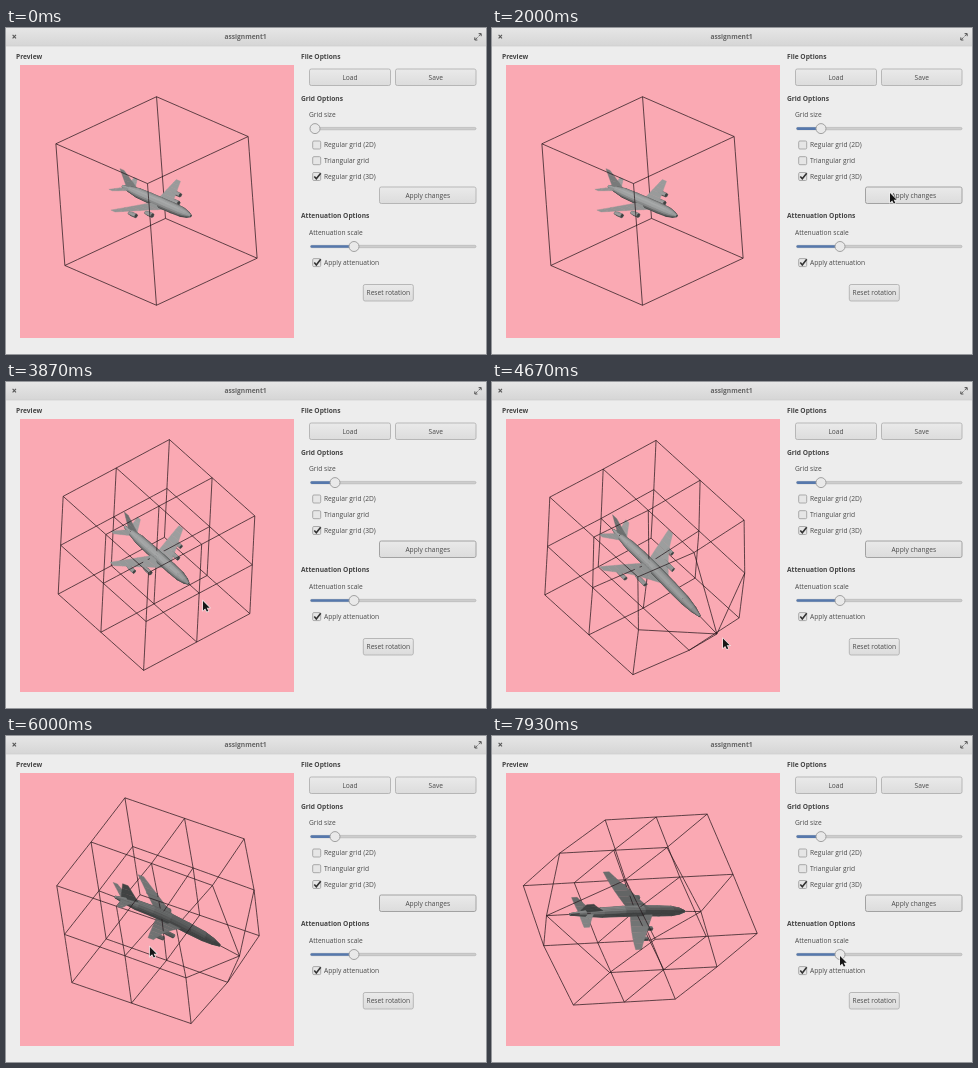
These frames come from a looping animation (480 px wide and 326 px high, 8000 ms). An HTML page with a canvas:

```html
<!DOCTYPE html>
<html lang="en">
<head>
<meta charset="utf-8">
<title>assignment1</title>
<style>
html, body { margin: 0; width: 100%; height: 100%; overflow: hidden; background: #ededed; }
svg, canvas { position: absolute; left: 0; top: 0; width: 480px; height: 326px; display: block; }
text { font: 6.65px "Open Sans", "Noto Sans", sans-serif; fill: #4a4a4a; }
.b { font-weight: 700; fill: #444; }
.title { fill: #666; }
.m { text-anchor: middle; }
.btn { fill: url(#face); stroke: #b2b2b2; stroke-width: .9; }
.btn.focus { stroke: #a2a2a2; stroke-width: 1; }
.btn.down { fill: #d2d2d2; }
.knob { fill: #e9e9e9; stroke: #999; stroke-width: .9; }
</style>
</head>
<body>
<svg id="ui" viewBox="0 0 480 326">
  <defs>
    <linearGradient id="bar" x1="0" y1="0" x2="0" y2="1">
      <stop offset="0" stop-color="#e6e6e6"/><stop offset="1" stop-color="#d6d6d6"/>
    </linearGradient>
    <linearGradient id="face" x1="0" y1="0" x2="0" y2="1">
      <stop offset="0" stop-color="#eaeaea"/><stop offset="1" stop-color="#dcdcdc"/>
    </linearGradient>
  </defs>
  <rect width="480" height="326" fill="#ededed"/>
  <rect width="480" height="17.5" fill="url(#bar)"/>
  <rect y="17.5" width="480" height=".8" fill="#c6c6c6"/>
  <path d="M6.6 6.9l3.4 3.4m0-3.4l-3.4 3.4" stroke="#555" stroke-width="1.1"/>
  <path d="M472.6 8.2l2.4-2.4m-3.6 3.6l-2.4 2.4M472.6 5.6h2.6v2.6m-6.4 1.2v2.6h2.6" stroke="#555" fill="none"/>
  <rect x="14" y="37" width="274" height="273" fill="#faa9b3"/>
</svg>
<canvas id="view" width="480" height="326"></canvas>
<svg viewBox="0 0 480 326">
  <path id="cursor" d="M0 0v9.4l2.2-2 1.6 3.2 1.5-.7-1.6-3.2h3z" fill="#161616" stroke="#f0f0f0" stroke-width="1.2" paint-order="stroke"/>
</svg>
<script>
const LOOP = 8000;
const ui = document.getElementById('ui');
const view = document.getElementById('view').getContext('2d');
const cursor = document.getElementById('cursor');

// ---------- window controls ----------
function add(tag, attrs, label) {
  const node = document.createElementNS('http://www.w3.org/2000/svg', tag);
  for (const k in attrs) node.setAttribute(k, attrs[k]);
  if (label) node.textContent = label;
  ui.append(node);
  return node;
}
const text = (x, y, label, cls = '') => add('text', { x, y, class: cls }, label);

function button(x, y, w, label) {
  const box = add('rect', { x, y, width: w, height: 16.5, rx: 1.8, class: 'btn' });
  text(x + w / 2, y + 10.6, label, 'm');
  return box;
}
function check(y, label, on) {
  add('rect', { x: 306.7, y: y - 4, width: 8, height: 8, rx: 1.2, fill: '#e6e6e6', stroke: '#a2a2a2', 'stroke-width': .9 });
  if (on) add('path', { d: `M308.3 ${y}l2 2.3 4.4-5.6`, fill: 'none', stroke: '#333', 'stroke-width': 1.6 });
  text(318, y + 2.4, label);
}
function slider(y, value) {
  add('rect', { x: 304.5, y: y - 1.2, width: 165.5, height: 2.4, rx: 1.2, fill: '#cdcdcd', stroke: '#b0b0b0', 'stroke-width': .6 });
  const fill = add('rect', { x: 304.5, y: y - 1.3, height: 2.6, rx: 1.3, fill: '#5678ac' });
  const knob = add('circle', { cy: y, r: 5, class: 'knob' });
  const set = x => { fill.setAttribute('width', x - 304.5); knob.setAttribute('cx', x); };
  set(value);
  return set;
}

text(239.5, 11.4, 'assignment1', 'b m title');
text(10, 31, 'Preview', 'b');
text(295, 31, 'File Options', 'b');
button(303.5, 41, 81, 'Load');
button(389.5, 41, 80.5, 'Save');
text(295, 72.5, 'Grid Options', 'b');
text(303, 89, 'Grid size');
const setSize = slider(100.6, 309);
check(117, 'Regular grid (2D)');
check(132.7, 'Triangular grid');
check(148.5, 'Regular grid (3D)', true);
const apply = button(373.5, 159, 96.5, 'Apply changes');
text(295, 190.2, 'Attenuation Options', 'b');
text(303, 206.5, 'Attenuation scale');
slider(218.5, 348);
check(234.6, 'Apply attenuation', true);
button(357.3, 256.5, 50, 'Reset rotation');

// ---------- motion tables: time, then values ----------
const cursorKeys = [
  [70, 382, 44], [800, 309, 100], [1200, 309, 100], [1650, 329, 101], [1730, 329, 101],
  [1950, 398, 165], [2750, 398, 165], [3130, 318, 196], [3330, 170, 160], [3700, 172, 188],
  [3860, 197, 219], [4000, 197, 219], [4750, 235, 261], [5200, 235, 261], [6000, 144, 211],
  [6500, 104, 178], [6600, 98, 176], [6800, 72, 177], [7050, 46, 180], [7400, 290, 200], [7850, 348, 220]
];
const sizeKeys = [[1200, 309], [1650, 329]];
// screen x row and y row of the model axes
const start = [.674, .066, -.7405, .293, .894, .345];
const tilted = [.6305, -.0367, -.7845, .557, .711, .4106];
const turned = [.858, -.4985, .11, .275, .6525, .711];
const level = [.711, -.601, .367, -.051, .484, .865];
const spinKeys = [[3330, ...start], [3700, ...tilted], [5200, ...tilted], [6000, ...turned], [6500, ...level]];
const handles = [
  { at: [1, 0, 0], pull: [.7, .46, -.126], keys: [[4000, 0], [4750, 1]] },
  { at: [-1, 0, 0], pull: [-.503, .447, -.214], keys: [[6600, 0], [6800, .38], [7050, 1]] }
];

function sample(keys, t) {
  const i = keys.findIndex(k => k[0] > t);
  if (i === 0) return keys[0].slice(1);
  if (i < 0) return keys[keys.length - 1].slice(1);
  const a = keys[i - 1], b = keys[i], f = (t - a[0]) / (b[0] - a[0]);
  return a.slice(1).map((v, j) => v + (b[j + 1] - v) * f);
}

// ---------- vectors ----------
const dot = (a, b) => a[0] * b[0] + a[1] * b[1] + a[2] * b[2];
const mix = (a, b, f) => a.map((v, i) => v + (b[i] - v) * f);
const unit = a => { const l = Math.hypot(...a) || 1; return a.map(v => v / l); };
const cross = (a, b) => [a[1] * b[2] - a[2] * b[1], a[2] * b[0] - a[0] * b[2], a[0] * b[1] - a[1] * b[0]];
const sub = (a, b) => a.map((v, i) => v - b[i]);

// ---------- lattice ----------
const steps = [-1, 0, 1];
const lattice = [];
for (const x of steps) for (const y of steps) for (const z of steps) lattice.push([x, y, z]);

function edges(cuts) {
  const list = [], span = cuts[1] - cuts[0];
  for (let axis = 0; axis < 3; axis++)
    for (const from of cuts.slice(0, -1)) for (const b of cuts) for (const c of cuts) {
      const p = [0, 0, 0];
      p[axis] = from; p[(axis + 1) % 3] = b; p[(axis + 2) % 3] = c;
      const q = p.slice();
      q[axis] += span;
      list.push([p, q]);
    }
  return list;
}
const coarse = edges([-1, 1]), fine = edges(steps);

// ---------- aeroplane: x to the nose, y down, z along a wing ----------
const faces = [];
function tube(profile, y, z, n) {
  const ring = ([x, r]) => Array.from({ length: n }, (_, i) => {
    const a = i / n * 2 * Math.PI;
    return [x, y + r * Math.sin(a), z + r * Math.cos(a)];
  });
  for (let k = 1; k < profile.length; k++) {
    const a = ring(profile[k - 1]), b = ring(profile[k]);
    for (let i = 0; i < n; i++) { const j = (i + 1) % n; faces.push([a[i], a[j], b[j], b[i]]); }
  }
  faces.push(ring(profile[0]), ring(profile[profile.length - 1]));
}
function plate(rootA, rootB, tipA, tipB, n) {
  for (let i = 0; i < n; i++) {
    const f = i / n, g = (i + 1) / n;
    faces.push([mix(rootA, tipA, f), mix(rootA, tipA, g), mix(rootB, tipB, g), mix(rootB, tipB, f)]);
  }
}
tube([[-.74, .012], [-.58, .042], [-.4, .07], [-.15, .076], [.1, .077], [.35, .077], [.55, .07], [.67, .046], [.75, .012]], 0, 0, 16);
for (const s of [-1, 1]) {
  plate([.26, .03, .05 * s], [-.06, .03, .05 * s], [-.19, -.01, .65 * s], [-.28, -.01, .65 * s], 6);
  plate([-.5, -.02, .03 * s], [-.66, -.02, .03 * s], [-.69, -.04, .25 * s], [-.76, -.04, .25 * s], 3);
  tube([[.04, .02], [.1, .03], [.19, .03]], .075, .26 * s, 6);
  tube([[-.12, .02], [-.06, .028], [.03, .028]], .065, .44 * s, 6);
}
plate([-.4, -.06, 0], [-.66, -.03, 0], [-.68, -.28, 0], [-.77, -.28, 0], 3);

// ---------- drawing ----------
const light = unit([-.45, -.55, .7]);

function drawScene(t) {
  const row = sample(spinKeys, t);
  const X = unit(row.slice(0, 3));
  let Y = row.slice(3);
  const lean = dot(X, Y);
  Y = unit(Y.map((v, i) => v - lean * X[i]));
  const Z = cross(X, Y);

  const active = handles.map(h => ({ ...h, f: sample(h.keys, t)[0] })).filter(h => h.f > 0);
  const shifts = lattice.map(g => active.reduce((s, h) => {
    const w = h.f * Math.exp(-1.6 * Math.hypot(...sub(g, h.at)));
    return s.map((v, i) => v + h.pull[i] * w);
  }, [0, 0, 0]));

  const project = p => {
    const q = p.slice();
    if (active.length) lattice.forEach((g, k) => {
      let w = 1;
      for (let i = 0; i < 3; i++) w *= Math.max(0, 1 - Math.abs(p[i] - g[i]));
      if (w) for (let i = 0; i < 3; i++) q[i] += w * shifts[k][i];
    });
    return [150.5 + 68.2 * dot(X, q), 173 + 68.2 * dot(Y, q), 68.2 * dot(Z, q)];
  };

  const items = faces.map(face => {
    const pts = face.map(project);
    let n = unit(cross(sub(pts[2], pts[0]), sub(pts[3], pts[1])));
    if (n[2] < 0) n = n.map(v => -v);
    const g = Math.round(62 + 105 * Math.max(0, dot(n, light)));
    return { pts, color: `rgb(${g},${g + 2},${g + 2})` };
  });
  for (const [a, b] of t < 2400 ? coarse : fine) {
    const p = project(a), q = project(b), n = 8;
    for (let i = 0; i < n; i++) items.push({ pts: [mix(p, q, i / n), mix(p, q, (i + 1) / n)] });
  }
  for (const it of items) it.z = it.pts.reduce((s, p) => s + p[2], 0) / it.pts.length;
  items.sort((a, b) => a.z - b.z);

  view.clearRect(0, 0, 480, 326);
  for (const { pts, color } of items) {
    view.beginPath();
    pts.forEach(p => view.lineTo(p[0], p[1]));
    view.strokeStyle = color || '#22161a';
    view.lineWidth = color ? .4 : .72;
    if (color) { view.closePath(); view.fillStyle = color; view.fill(); }
    view.stroke();
  }
}

const origin = performance.now();
function tick() {
  const t = (performance.now() - origin) % LOOP;
  drawScene(t);
  setSize(sample(sizeKeys, t)[0]);
  apply.setAttribute('class', 'btn' + (t > 1880 ? ' focus' : '') + (t > 2270 && t < 2400 ? ' down' : ''));
  const [x, y] = sample(cursorKeys, t);
  cursor.setAttribute('transform', `translate(${x} ${y})`);
  cursor.setAttribute('visibility', t < 70 ? 'hidden' : 'visible');
  requestAnimationFrame(tick);
}
tick();
</script>
</body>
</html>
```
